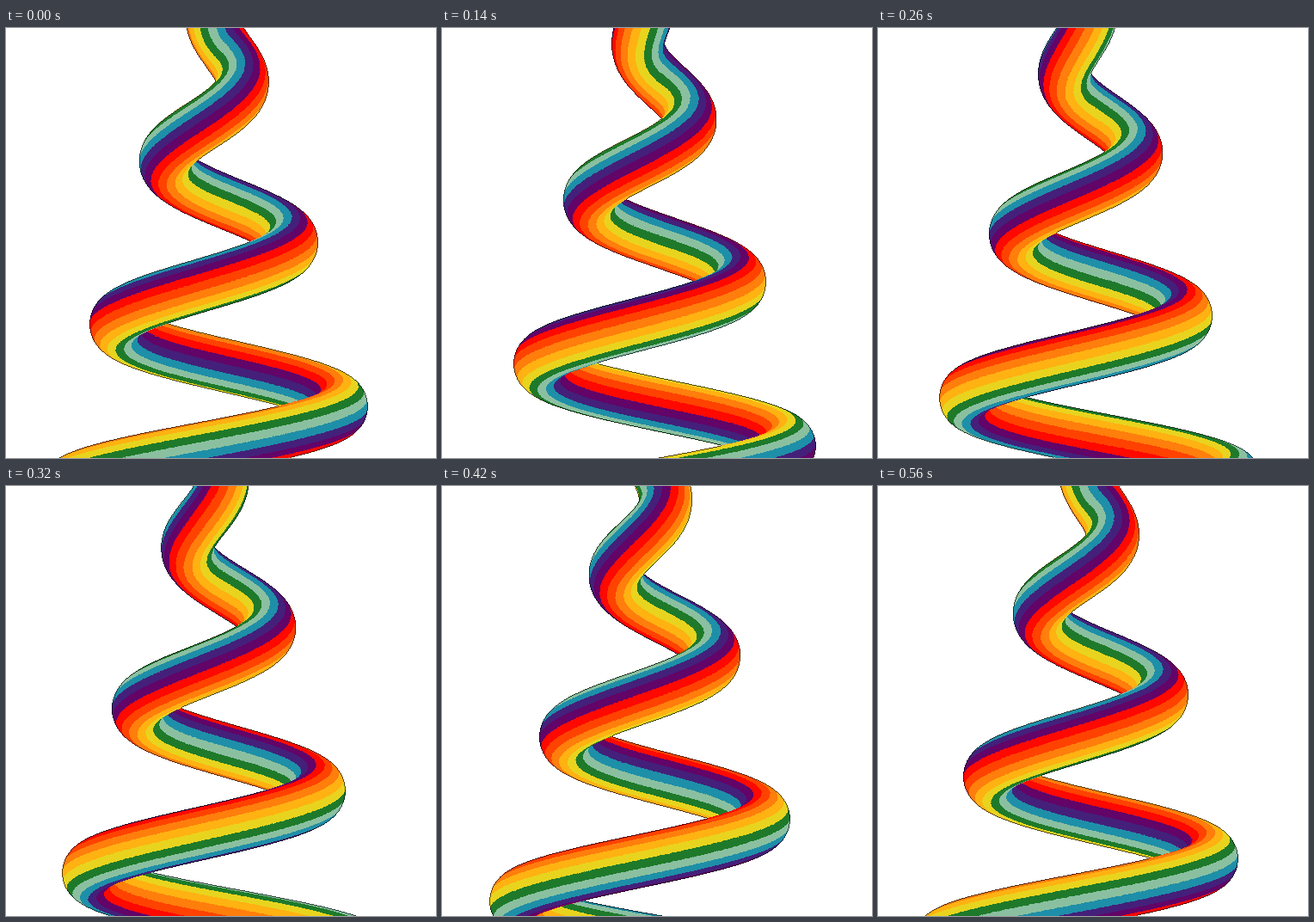
An HTML page with a canvas for the animation above (0.58 s loop, 500 px wide and 500 px high).

```html
<!DOCTYPE html>
<html lang="en">
<head>
<meta charset="utf-8">
<title>Rainbow helix</title>
<style>
  html, body { margin: 0; width: 100%; height: 100%; overflow: hidden; background: #fff; }
  canvas { display: block; }
</style>
</head>
<body>
<canvas id="stage" width="500" height="500"></canvas>
<script>
const SIZE = 500, LOOP = 580, STEP = 20;
const CX = 244.5, TOP = -42;     // cone axis and apex
const GROW = 58 / (2 * Math.PI); // radius gained per radian
const DROP = 192 / (2 * Math.PI); // height lost per radian
const TUBE = 30.5, U_END = 19, SLICES = 400;

// Stripe colours in order around the tube; the set repeats twice.
const colours = [
  [30, 122, 42], [232, 212, 30], [255, 178, 18], [255, 126, 12], [255, 66, 0],
  [255, 8, 0], [98, 4, 104], [68, 32, 122], [30, 143, 168], [138, 192, 160]
];
const pack = (rgb, k) =>
  rgb.reduce((sum, v, i) => sum + Math.round(v * k) * 256 ** i, 255 * 256 ** 3);
const fills = colours.map(c => pack(c, 1));
const edges = colours.map(c => pack(c, 0.35));

const ring = Array.from({ length: SLICES }, (_, i) => i / SLICES * 2 * Math.PI);
const ringCos = Float64Array.from(ring, Math.cos);
const ringSin = Float64Array.from(ring, Math.sin);

const ctx = document.getElementById('stage').getContext('2d');
const depth = new Float32Array(SIZE * SIZE);
const band = new Int8Array(SIZE * SIZE);

// Sweep a circle down the conical helix into a depth buffer.
function sweep(phase) {
  depth.fill(-1e9);
  band.fill(-1);
  for (let u = 0; u < U_END;) {
    const rho = GROW * u, angle = u - 2 * Math.PI * phase;
    const c = Math.cos(angle), s = Math.sin(angle);
    const m = Math.hypot(rho, DROP), len = Math.hypot(m, GROW);
    const px = CX - rho * c, py = TOP + DROP * u, pz = -rho * s;
    // Untwisted frame: the stripes slowly turn relative to the axis.
    const twist = 10 / Math.PI * DROP / GROW * Math.asinh(rho / DROP) - 10 * phase + 14.4;
    const nr = m / len, nt = -GROW * rho / (m * len), ny = -GROW * DROP / (m * len);
    const bt = DROP / m, by = -rho / m;

    for (let i = 0; i < SLICES; i++) {
      const cp = ringCos[i], sp = ringSin[i];
      const a = cp * nr, b = cp * nt + sp * bt;
      const nz = -a * s - b * c;
      if (nz < 0) continue;
      const x = Math.floor(px + TUBE * (b * s - a * c));
      const y = Math.floor(py + TUBE * (cp * ny + sp * by));
      if (x < 0 || y < 0 || x >= SIZE || y >= SIZE) continue;
      const at = y * SIZE + x, z = pz + TUBE * nz;
      if (z <= depth[at]) continue;
      depth[at] = z;
      band[at] = Math.floor(twist + i * 20 / SLICES) % 10;
    }
    u += 0.5 / (m + TUBE);
  }
}

function render(phase) {
  sweep(phase);
  const image = ctx.createImageData(SIZE, SIZE);
  const out = new Uint32Array(image.data.buffer).fill(0xffffffff);
  for (let i = 0; i < out.length; i++) {
    if (band[i] < 0) continue;
    const x = i % SIZE;
    const rim = band[i - SIZE] < 0 || band[i + SIZE] < 0 ||
      (x > 0 && band[i - 1] < 0) || (x < SIZE - 1 && band[i + 1] < 0);
    out[i] = (rim ? edges : fills)[band[i]];
  }
  return image;
}

const frames = [];
let shown = -1;
const start = performance.now();

function draw() {
  const time = Math.max(0, performance.now() - start) % LOOP;
  const n = Math.floor(time / STEP);
  if (n !== shown) {
    frames[n] ??= render(n * STEP / LOOP);
    ctx.putImageData(frames[n], 0, 0);
    shown = n;
  }
  requestAnimationFrame(draw);
}
draw();
</script>
</body>
</html>
```
